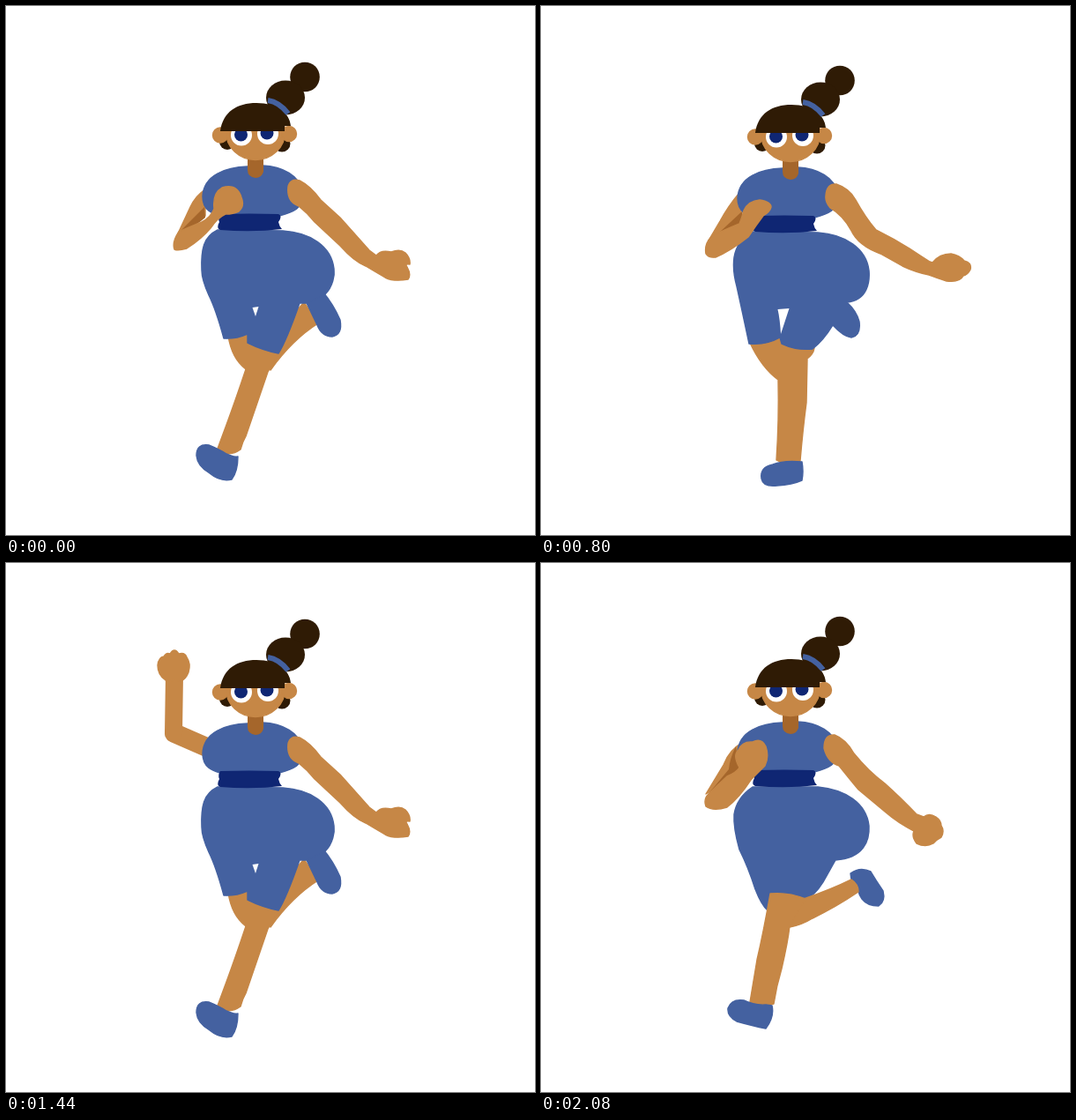
Animation, 600 px wide and 600 px high, one loop 2160 ms. Source, as an HTML page without scripts:

```html
<!DOCTYPE html>
<html lang="en">
<head>
<meta charset="utf-8">
<title>Running girl</title>
<style>
html, body { margin: 0; width: 100%; height: 100%; overflow: hidden; background: #fff; }
svg { display: block; width: 100%; height: 100%; }
.skin, .blue { stroke-width: 1.4; stroke-linejoin: round; }
.skin { fill: #c68746; stroke: #c68746; }
.blue { fill: #4461a0; stroke: #4461a0; }
.shade { fill: #a5662b; stroke: none; }
.navy { fill: #0f2673; }
.hair { fill: #2f1b05; }
.white { fill: #fff; }
.limb { fill: none; stroke: #c68746; stroke-width: 28; stroke-linecap: round; stroke-linejoin: round; }
.thin { stroke-width: 22; }

/* --i is the 80 ms step in which a pose shows */
.pose { opacity: 0; animation: pose 720ms step-end calc(var(--i) * 80ms - 720ms) infinite; }
.wave { opacity: 0; animation: wave 2160ms step-end calc(var(--i) * 80ms - 2160ms) infinite; }
.arm { animation: away 2160ms step-end infinite; }
.bob { animation: bob 720ms step-end infinite; }
.bun { animation: bun 720ms step-end infinite; }
@keyframes pose { 0% { opacity: 1; } 11.1112%, 100% { opacity: 0; } }
@keyframes wave { 0% { opacity: 1; } 3.7038%, 100% { opacity: 0; } }
@keyframes away { 0% { opacity: 1; } 44.4444% { opacity: 0; } 81.4814%, 100% { opacity: 1; } }
@keyframes bob {
  0%, 100% { transform: none; }
  11.1111% { transform: translateY(2px); }
  22.2222% { transform: translateY(1px); }
  33.3333% { transform: translateY(-1px); }
  44.4444% { transform: translateY(-3px); }
  55.5555% { transform: translateY(-2px); }
  66.6666% { transform: translateY(2px); }
  77.7777% { transform: translateY(1px); }
  88.8888% { transform: translateY(-1px); }
}
@keyframes bun {
  0%, 22.2222%, 77.7777%, 100% { transform: none; }
  11.1111% { transform: translateY(2px); }
  33.3333% { transform: translateY(-2px); }
  44.4444% { transform: translateY(-5px); }
  55.5555% { transform: translateY(-1px); }
  66.6666% { transform: translateY(3px); }
  88.8888% { transform: translateY(-2px); }
}
</style>
</head>
<body>
<svg viewBox="0 0 600 600">
<defs>
  <g id="fore">
    <path class="limb" stroke-width="20" style="stroke-width:20" d="M0 0L1 -66"/>
    <path class="skin" d="M-9 -60Q-18 -66 -18 -77Q-17 -86 -11 -87Q-8 -92 -4 -90Q1 -98 6 -90Q13 -92 15 -86Q20 -79 17 -69Q14 -61 8 -59Z"/>
  </g>
  <path id="shoe" class="blue" d="M-34 14Q-34 2 -20 -1L15 -4Q20 4 17 16Q4 21 -14 25Q-33 27 -34 14Z"/>
</defs>

<!-- waving arm, behind the body -->
<g class="wave" style="--i:12"><path class="limb thin" d="M230 210L185 255"/><use href="#fore" transform="translate(185 255) rotate(5)"/></g>
<g class="wave" style="--i:13"><path class="limb thin" d="M230 207L172 215"/><use href="#fore" transform="translate(172 215) rotate(-18)"/></g>
<g class="wave" style="--i:14"><path class="limb thin" d="M230 207Q195 202 173 190"/><use href="#fore" transform="translate(171 189) rotate(-11)"/></g>
<g class="wave" style="--i:15"><path class="limb thin" d="M230 207L165 192"/><use href="#fore" transform="translate(165 192) rotate(-18)"/></g>
<g class="wave" style="--i:16"><path class="limb thin" d="M230 208L170 191"/><use href="#fore" transform="translate(170 191) rotate(-10)"/></g>
<g class="wave" style="--i:17"><path class="limb thin" d="M230 208L182 193"/><use href="#fore" transform="translate(182 193) rotate(-3)"/></g>
<g class="wave" style="--i:18"><path class="limb thin" d="M230 210L191 193"/><use href="#fore" transform="translate(190 193)"/></g>
<g class="wave" style="--i:19"><path class="limb thin" d="M230 210L181 194"/><use href="#fore" transform="translate(181 194) rotate(-6)"/></g>
<g class="wave" style="--i:20"><path class="limb thin" d="M230 209L168 200"/><use href="#fore" transform="translate(168 200) rotate(-14)"/></g>
<g class="wave" style="--i:21"><path class="limb thin" d="M230 208L178 235"/><use href="#fore" transform="translate(178 235) rotate(-25)"/></g>

<!-- legs, shorts and the far part of the arm -->
<g class="pose" style="--i:0">
  <g class="arm">
    <path class="skin" d="M226 208Q215 215 209 228L195 258L226 238Z"/>
    <path class="shade" d="M225 228L196 257Q215 250 226 240Z"/>
  </g>
  <path class="skin" d="M338 336L354 360C335 372 318 388 300 413L290 390Z"/>
  <path class="skin" d="M252 374Q256 400 272 412Q260 448 250 475L240 502Q252 513 266 503Q268 495 272 488L297 415L310 394L274 370Z"/>
  <path class="blue" d="M338 330L360 325Q371 338 379 356Q382 373 370 375Q358 375 353 362L341 337Z"/>
  <path class="blue" d="M216 510Q216 496 230 498Q242 503 250 508Q258 512 263 511Q263 528 256 537Q243 540 231 530Q217 522 216 510Z"/>
  <path class="blue" d="M240 254C224 262 221 275 222 300Q222 310 230 328Q238 344 247 377Q260 378 274 372L274 382Q290 390 309 394Q318 380 333 337L341 337L362 327C371 318 373 305 372 298C369 272 345 257 314 255Z"/>
  <path class="white" d="M279.500 342L286.500 341L283 352Z"/>
</g>
<g class="pose" style="--i:1">
  <g class="arm">
    <path class="skin" d="M225 212Q213 226 203 244L190 266L228 246Z"/>
    <path class="shade" d="M229 232L201 258Q218 250 227 246Z"/>
  </g>
  <path class="skin" d="M237 382Q250 410 269 424Q270 470 267 515Q280 522 294 516Q297 480 301 450L302 400Q309 395 310 388L272 374Z"/>
  <path class="blue" d="M250 536Q248 523 263 520Q275 515 296 517Q298 528 296 538Q285 543 268 544Q252 546 250 536Z"/>
  <path class="blue" d="M240 256Q222 266 219 285Q217 300 222 318Q228 345 236 383Q255 385 271 376L273 383Q290 391 308 389Q320 380 331 362Q343 375 352 376Q363 374 361 358Q358 346 347 336C371 334 373 312 372 300C369 275 345 259 314 257Z"/>
  <path class="white" d="M268.500 344L281.500 343L272 372Q271 355 268.500 344Z"/>
</g>
<g class="pose" style="--i:2">
  <g class="arm">
    <path class="limb thin" d="M230 218L200 272"/>
    <path class="shade" d="M229 236L203 264L228 252Z"/>
  </g>
  <path class="limb" d="M287 350L290 412L308 500"/>
  <use href="#shoe" transform="translate(310 506) rotate(-12)"/>
  <path class="blue" d="M238 256Q222 268 219 285Q215 320 220 378Q238 390 270 388L307 388Q318 365 330 340C368 336 373 315 372 298C369 273 345 258 314 256Z"/>
  <path class="limb" d="M246 374L318 379"/>
  <path class="blue" d="M316 366Q328 360 342 365Q348 376 343 394Q338 407 328 405Q318 399 317 390Q323 378 316 366Z"/>
</g>
<g class="pose" style="--i:3">
  <g class="arm">
    <path class="limb thin" d="M235 262L212 280"/>
    <circle class="skin" cx="207" cy="285" r="17"/>
  </g>
  <path class="limb" d="M300 350L312 410L350 472"/>
  <use href="#shoe" transform="translate(354 478) rotate(-40)"/>
  <path class="blue" d="M238 254Q222 268 218 290Q208 325 201 360Q215 376 244 380L285 366L295 390Q312 394 328 385L332 337C368 334 373 312 372 297C369 270 345 256 314 254Z"/>
  <path class="limb" d="M222 368L240 440"/>
  <use href="#shoe" transform="translate(242 450) rotate(-10)"/>
</g>
<g class="pose" style="--i:4">
  <g class="arm">
    <path class="limb thin" d="M238 265L200 280"/>
    <circle class="skin" cx="194" cy="282" r="17"/>
  </g>
  <path class="limb" d="M220 330L206 376L217 492"/>
  <use href="#shoe" transform="translate(214 502) rotate(8)"/>
  <path class="limb" d="M312 350L324 408L376 382"/>
  <path class="blue" d="M370 364Q380 356 392 363Q402 374 405 390Q403 402 393 402Q384 398 382 390Q384 374 370 364Z"/>
  <path class="blue" d="M236 254Q228 260 225 275Q210 310 194 354Q210 368 233 373Q242 352 252 336L288 338Q292 365 302 394Q320 398 338 378L336 332Q368 328 372 300C371 270 345 254 312 252Z"/>
</g>
<g class="pose" style="--i:5">
  <g class="arm">
    <path class="skin" d="M226 258L204 264Q196 258 186 260Q176 259 172 270Q172 278 178 282Q180 294 190 295Q202 292 204 287L222 279Z"/>
    <path class="shade" d="M224 259L218 281Q228 282 236 254Z"/>
  </g>
  <path class="skin" d="M195 355Q187 380 190 394Q200 430 207 465Q212 490 220 514Q235 516 249 512Q246 500 243 480Q240 445 222 398Q226 385 229 370Z"/>
  <path class="blue" d="M201 530Q200 515 215 514Q230 512 251 512Q257 514 256 528Q253 536 240 538Q225 545 210 542Q200 538 201 530Z"/>
  <path class="blue" d="M359 342C363 330 374 326 382 327Q390 330 393 344Q400 359 397 366Q391 376 384 373Q375 368 376 355L368 346Z"/>
  <path class="skin" d="M302 393Q308 415 317 427Q326 433 334 426Q342 415 354 398Q366 378 377 360Q380 347 374 342Q363 340 357 347Q347 362 338 375L325 388Z"/>
  <path class="blue" d="M236 254Q230 260 227 275Q215 305 206 330L196 356Q210 366 232 373.500Q240 353 248 335Q270 338 290 339Q292 360 297 392Q310 398 325 392Q337 386 339 375Q339 350 335 333Q365 328 371 305Q375 280 352 263L310 252Z"/>
</g>
<g class="pose" style="--i:6">
  <g class="arm">
    <path class="skin" d="M222 281Q200 289 177 287Q172 275 162 276Q148 272 145 283Q144 290 142 295Q140 305 146 306Q150 314 162 314Q170 312 176 306Q195 308 215 307Z"/>
    <path class="shade" d="M212 286Q212 295 206 307L218 307L222 281Z"/>
  </g>
  <path class="skin" d="M214 375Q212 400 220 412Q228 425 236 430Q255 455 275 480L288 499Q300 503 315 495Q316 490 303 475Q285 450 273 435Q255 412 246 403Q245 390 247 378Z"/>
  <path class="blue" d="M271 515Q272 504 290 499L300 500Q310 499 317 492Q324 500 325 510Q318 518 304 521Q290 530 278 527Q271 522 271 515Z"/>
  <path class="blue" d="M240 256Q225 268 221 285Q214 320 211 375Q225 382 240 383L290 358Q325 338 345 332Q372 325 372 295C369 277 347 259 312 258Z"/>
  <path class="blue" d="M320 364Q330 357 345 361Q350 372 346 390Q342 405 332 404Q322 398 320 388Q326 376 320 364Z"/>
  <path class="skin" d="M237 380Q238 355 248 352Q265 346 280 352Q300 360 322 361Q328 372 322 382Q280 387 245 383Z"/>
</g>
<g class="pose" style="--i:7">
  <g class="arm">
    <path class="limb thin" d="M232 264L190 284"/>
    <circle class="skin" cx="184" cy="286" r="17"/>
  </g>
  <path class="limb" d="M247 360L254 408L334 444"/>
  <path class="blue" d="M330 428Q343 424 354 434Q364 448 362 462Q354 472 343 466Q334 460 338 448Z"/>
  <path class="blue" d="M239 256Q222 268 219 285Q214 320 216 372Q240 384 274 384L305 372Q322 350 334 338C369 334 373 312 372 297C369 272 345 258 314 256Z"/>
  <path class="limb" d="M246 374L258 456"/>
  <use href="#shoe" transform="translate(254 466) rotate(6)"/>
</g>
<g class="pose" style="--i:8">
  <g class="arm">
    <path class="skin" d="M230 203Q214 211 207 229L187 262L226 240Z"/>
    <path class="shade" d="M221 208Q214 222 213 234L188 264L226 240Z"/>
  </g>
  <path class="blue" d="M240 254Q222 266 219 285Q218 300 225 325Q235 345 243 370Q250 388 257 394L280 390L300 381Q310 378 320 362L334 337C366 335 373 315 372 298C369 272 345 257 314 254Z"/>
  <path class="blue" d="M351 352Q362 344 374 350Q380 360 388 372Q391 384 383 389Q370 389 364 381Q358 372 360 367L352 360Z"/>
  <path class="skin" d="M298 381Q330 370 352 359Q360 364 360 373Q335 390 308 403Q295 411 282 413L275 390Z"/>
  <path class="skin" d="M260 375Q252 420 245 450Q240 480 237 498Q250 505 264 500Q267 480 273 460Q280 430 282 412L300 381Q280 373 260 375Z"/>
  <path class="blue" d="M212 505Q216 494 230 496Q242 502 255 501L262 502Q265 515 255 528Q240 525 222 520Q211 514 212 505Z"/>
</g>

<!-- torso and head -->
<g class="bob">
  <path class="blue" d="M274 182C250 183 224 191 223 216C223 233 236 236 243 238H310C325 234 338 230 337 212C334 192 313 182 291 181Z"/>
  <path class="navy" d="M243 236Q276 235 309 236Q314 238 309 245Q310 250 313 253Q280 257 243 254Q238 252 242 245Q240 240 243 236Z"/>
  <path class="shade" d="M274 170H292V188Q290 195 283 195Q274 194 274 186Z"/>
  <g class="hair">
    <circle class="bun" cx="339" cy="80.500" r="16.800"/>
    <ellipse cx="317" cy="104" rx="22" ry="19.500"/>
    <circle cx="251" cy="154" r="9"/>
    <circle cx="313" cy="156" r="9.500"/>
  </g>
  <g class="skin">
    <ellipse cx="283" cy="143" rx="33.500" ry="31.500"/>
    <circle cx="243" cy="146.500" r="8.500"/>
    <circle cx="321" cy="145" r="8.500"/>
  </g>
  <g class="white"><circle cx="267" cy="146.500" r="12"/><circle cx="297" cy="145" r="12"/></g>
  <g class="navy"><circle cx="266.500" cy="146" r="7.500"/><circle cx="296" cy="144" r="7.500"/></g>
  <path class="hair" d="M243 142C246 120 262 110 284 110C308 110 322 122 323 136H316V142Z"/>
  <path d="M297 107Q310 109 320 122" fill="none" stroke="#4461a0" stroke-width="6"/>
</g>

<!-- near arm and the near part of the other forearm -->
<g class="pose skin" style="--i:0">
  <path d="M320 205Q322 195 333 198Q345 204 357 220L379 240Q395 258 412 277L420 283Q425 276 437 279Q447 275 453 280Q459 286 458 293Q452 292 455 296Q460 305 456 310Q440 313 430 308Q418 301 408 295Q395 290 379 272L350 245Q342 235 332 227Q318 222 320 205Z"/>
  <path class="arm" d="M191 276Q188 268 196 256Q210 250 222 245Q232 240 236 230Q234 212 245 206Q262 201 267 217Q271 227 264 233Q258 236 249 236Q240 240 232 252Q222 264 205 275Q195 278 191 276Z"/>
</g>
<g class="pose skin" style="--i:1">
  <path d="M323 215Q324 201 335 202Q350 207 357 220Q368 240 380 254Q400 264 418 275Q430 283 441 290L444 291Q452 281 465 281Q475 283 480 289Q489 291 487 299Q484 305 479 306Q475 314 460 312Q448 308 440 305Q425 302 410 295L385 281Q360 272 352 255Q343 238 328 229Q322 222 323 215Z"/>
  <path class="arm" d="M187 281Q185 270 193 262L202 257Q215 251 225 247Q228 240 230 232Q235 221 248 220Q261 222 261 228Q260 233 252 238Q243 250 235 262Q215 278 198 285Q190 286 187 281Z"/>
</g>
<g class="pose skin" style="--i:2">
  <path class="limb thin" d="M333 214L368 268L424 309"/><circle cx="434" cy="316" r="17"/>
  <g class="arm"><path class="limb thin" d="M199 278L230 262"/><circle cx="236" cy="258" r="16"/></g>
</g>
<g class="pose skin" style="--i:3">
  <path class="limb thin" d="M327 215L370 268L358 306"/><circle cx="354" cy="314" r="17"/>
</g>
<g class="pose skin" style="--i:4">
  <path class="limb thin" d="M318 213L354 266L290 276"/><circle cx="278" cy="276" r="18"/>
</g>
<g class="pose skin" style="--i:5">
  <path d="M296 222Q295 206 304 204Q320 201 331 212Q338 235 352 265Q352 276 343 274Q320 272 300 267Q270 263 250 253Q240 256 228 254Q218 248 222 240Q214 238 216 228Q222 224 222 219Q232 214 243 217Q251 222 254 233Q278 245 306 248Q304 236 296 222Z"/>
  <path class="shade" d="M306 246Q319 245 324 253Q315 251 306 249Z"/>
</g>
<g class="pose skin" style="--i:6">
  <path d="M309 220Q311 203 324 204Q335 207 350 222Q370 238 384 260Q380 275 365 285Q350 296 337 307Q328 318 314 317Q302 314 301 306Q293 302 296 295Q298 290 299 284Q306 280 316 283Q325 280 330 286Q345 275 353 264Q335 248 321 238Q308 235 309 220Z"/>
</g>
<g class="pose skin" style="--i:7">
  <path class="limb thin" d="M328 213L374 266L394 306"/><circle cx="398" cy="315" r="17"/>
</g>
<g class="pose skin" style="--i:8">
  <path d="M321 210Q321 194 333 195Q346 200 355 216Q372 237 390 250Q410 268 426 285L434 288Q440 283 448 288Q454 292 454 298Q458 304 454 311Q448 314 445 318Q436 323 426 318Q420 310 423 304Q405 295 390 282L360 257Q350 245 338 230Q325 226 321 210Z"/>
  <path class="arm" d="M187 276Q184 268 190 262Q200 252 211 242Q222 237 225 232Q217 218 224 212Q228 202 240 203Q250 198 255 208Q259 220 254 230Q246 238 238 246Q225 266 211 277Q195 282 187 276Z"/>
</g>
</svg>
</body>
</html>
```
